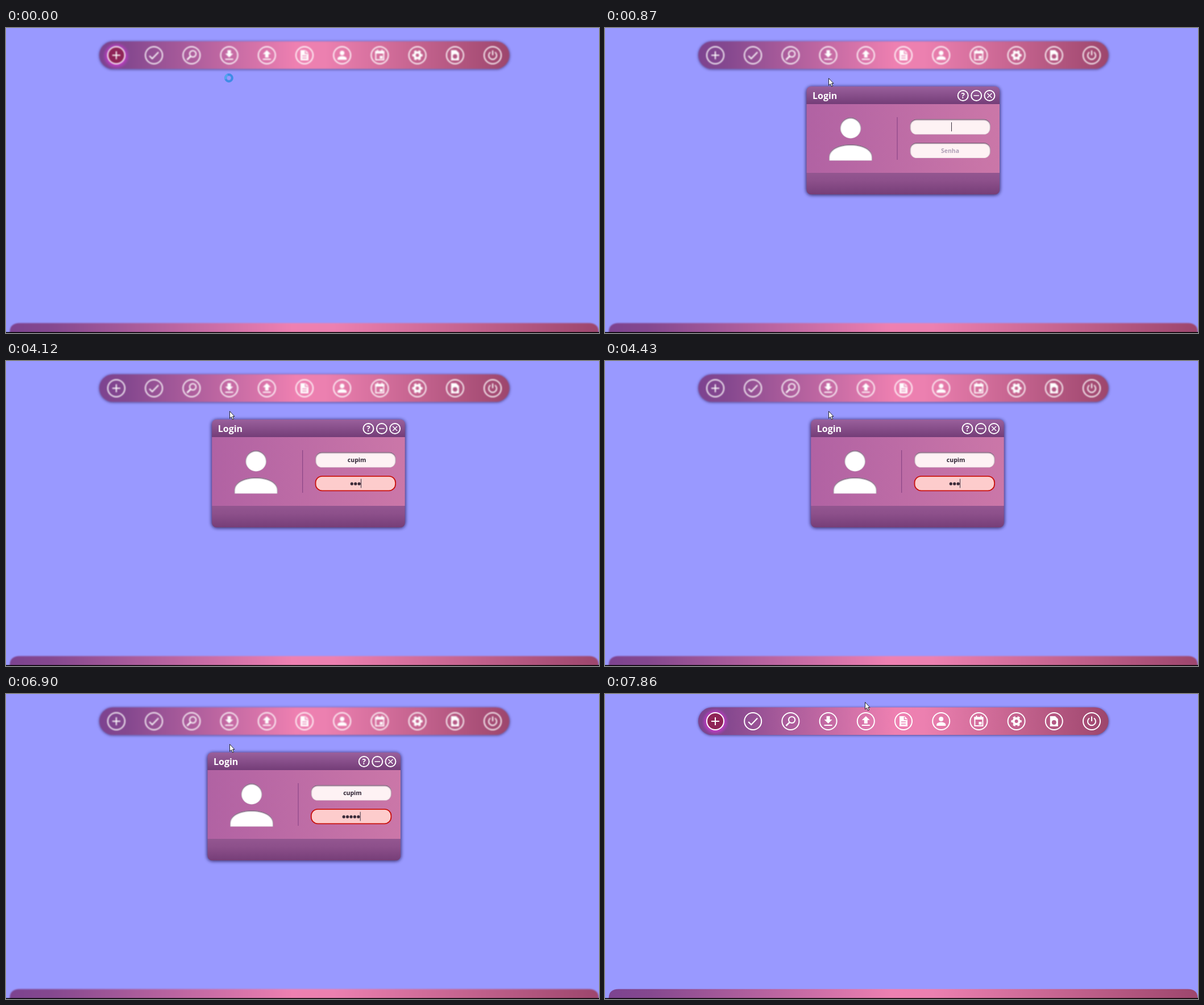
Recreate the animation shown at these times as an HTML page. Size 1043 by 537 pixels, loop 8000 ms.

```html
<!DOCTYPE html>
<html lang="pt">
<head>
<meta charset="utf-8">
<title>Login</title>
<style>
  html, body { margin: 0; width: 100%; height: 100%; overflow: hidden; background: #9999ff; }
  svg { display: block; width: 100%; height: 100%; }
  text { font-family: "Open Sans", "Noto Sans", sans-serif; font-weight: 700; }
  .line { fill: none; stroke: #fff; stroke-width: 2; }
  .field { font-size: 10.5px; text-anchor: middle; fill: #2b2030; }
  .caret { stroke: #3a3040; stroke-width: 1; }
</style>
</head>
<body>
<svg viewBox="0 0 1043 537">
  <defs>
    <linearGradient id="bar">
      <stop offset="0" stop-color="#7d4390"/>
      <stop offset=".07" stop-color="#85488f"/>
      <stop offset=".48" stop-color="#ee80b1"/>
      <stop offset=".55" stop-color="#ec80b0"/>
      <stop offset="1" stop-color="#9d466d"/>
    </linearGradient>
    <linearGradient id="head" x2="0" y2="1">
      <stop stop-color="#9a609c"/><stop offset="1" stop-color="#743d78"/>
    </linearGradient>
    <linearGradient id="body">
      <stop stop-color="#b162a3"/><stop offset="1" stop-color="#cb77a8"/>
    </linearGradient>
    <linearGradient id="foot" x2="0" y2="1">
      <stop stop-color="#935690"/><stop offset=".35" stop-color="#8d508b"/><stop offset="1" stop-color="#753d77"/>
    </linearGradient>
    <radialGradient id="glow">
      <stop offset=".6" stop-color="#c83cc8"/><stop offset="1" stop-color="#b03cc0" stop-opacity="0"/>
    </radialGradient>
    <clipPath id="frame"><rect x="354.5" y="103" width="339.5" height="190" rx="8"/></clipPath>
    <filter id="soft" color-interpolation-filters="sRGB"><feGaussianBlur stdDeviation="1.05"/></filter>
    <filter id="shade" x="-10%" y="-50%" width="120%" height="200%"><feGaussianBlur stdDeviation="2"/></filter>
    <filter id="deep" x="-10%" y="-15%" width="120%" height="130%"><feGaussianBlur stdDeviation="3.4"/></filter>
    <filter id="inset" color-interpolation-filters="sRGB">
      <feOffset in="SourceAlpha" dy="1"/>
      <feGaussianBlur stdDeviation="1.3" result="in"/>
      <feComposite in="SourceAlpha" in2="in" operator="out" result="edge"/>
      <feFlood flood-color="#3c143c"/>
      <feComposite in2="edge" operator="in" result="dark"/>
      <feMerge><feMergeNode in="SourceGraphic"/><feMergeNode in="dark"/></feMerge>
    </filter>
  </defs>

  <rect width="1043" height="537" fill="#9999ff"/>
  <g id="chrome">
    <rect x="164" y="24" width="722" height="49" rx="24.5" fill="#35255f" opacity=".75" filter="url(#shade)"/>
    <rect x="164" y="23.5" width="721.5" height="48.5" rx="24.2" fill="url(#bar)"/>
    <path d="M6.500 537V535Q7 519.500 24 519.500H1025Q1042 519.500 1042.500 535V537Z" fill="url(#bar)"/>
    <g id="focus">
      <circle cx="194" cy="49" r="24" fill="url(#glow)"/>
      <circle cx="194" cy="48" r="15" fill="#8f2457"/>
    </g>
    <g id="icons"></g>
  </g>
  <rect y="535.4" width="1043" height="1.6" fill="#000"/>

  <g id="dialog">
    <rect x="354" y="103.500" width="340.500" height="190.500" rx="9" fill="#181038" opacity=".85" filter="url(#deep)"/>
    <g clip-path="url(#frame)">
      <rect x="354" y="103" width="341" height="31" fill="url(#head)"/>
      <rect x="354" y="134" width="341" height="121" fill="url(#body)"/>
      <rect x="354" y="255" width="341" height="39" fill="url(#foot)"/>
    </g>
    <text x="365" y="125" font-size="16" fill="#fff">Login</text>
    <g class="line" stroke-width="1.7">
      <circle cx="629.7" cy="119" r="9"/>
      <circle cx="653.2" cy="119" r="9"/>
      <circle cx="676.4" cy="119" r="9"/>
      <path d="M648.500 119h9.500M672.400 115l8 8M680.400 115l-8 8" stroke-width="1.5"/>
    </g>
    <text x="629.7" y="124" font-size="13.5" text-anchor="middle" fill="#fff">?</text>
    <g fill="#fff" filter="url(#inset)">
      <circle cx="432" cy="176" r="18.5"/>
      <path d="M394 233.500V227C394 213 411 205 432 205S470 213 470 227V233.500Z"/>
    </g>
    <path d="M514 157V232" stroke="#823f82"/>
    <rect x="536.5" y="160.5" width="141.500" height="27" rx="11.5" fill="#fef2f4" filter="url(#inset)"/>
    <rect id="plain" x="536.5" y="202" width="141.500" height="27" rx="11.5" fill="#fef2f4" filter="url(#inset)"/>
    <rect id="wrong" x="536.8" y="202.8" width="140.600" height="25.500" rx="11.5" fill="#fdcccc" stroke="#c8100c" stroke-width="1.8"/>
    <text id="user" class="field" x="609.4" y="178"></text>
    <text id="hint" class="field" x="607" y="219.700" style="fill:#b0a0b6">Senha</text>
    <g id="dots" fill="#3a2a38"></g>
    <path id="userCaret" class="caret" d="M0 166v16"/>
    <path id="passCaret" class="caret" d="M0 207.500v16"/>
  </g>

  <g id="busy" fill="none" stroke-width="4.2">
    <circle cx="392" cy="88" r="5.800" stroke="#3f8ce6"/>
    <path d="M386.600 90A5.800 5.800 0 0 1 390 82.600" stroke="#55a5ee"/>
  </g>
  <path id="arrow" d="M.5.5V13L3.400 10.300 5.400 15 7.600 14 5.600 9.600H9Z" fill="#fff" stroke="#111" stroke-width=".9"/>
</svg>
<script>
const $ = id => document.getElementById(id);
const LOOP = 8000, NAME = "cupim";
const FADE_IN = [470, 550, 620, 700, 780, 870];
const FADE_OUT = [7300, 7380, 7460, 7550, 7630];
const KEYS = [1650, 1950, 2110, 2180, 2350];
const SECRET = [3270, 3500, 3730], ERASE = [5360, 5510, 5660];
const RETRY = [6140, 6520, 6670, 6750, 6900];
const ALPHA = [0, .15, .36, .56, .73, .88, 1];

const stroke = (d, w = 2) => `<path class="line" d="${d}" style="stroke-width:${w}"/>`;
const solid = d => `<path d="${d}" fill="#fff"/>`;
const ICONS = [
  stroke("M-7 0H7M0-7V7"),
  stroke("M-8 1L-3 6 8-5.500", 2.2),
  `<circle class="line" cx="2.200" cy="-2.500" r="5.600"/>` + stroke("M-2 2L-8 8", 2.6),
  solid("M-3-9H3V-3H7L0 4-7-3H-3ZM-7 6H7V8H-7Z"),
  solid("M-3 4H3V-2H7L0-9-7-2H-3ZM-7 6H7V8H-7Z"),
  solid("M-7-9H2L7-4V9H-7Z") + `<path d="M-4 1H4M-4 5H4M1.500-8V-3H6.500" fill="none" stroke="#e983b2" stroke-width="1.600"/>`,
  `<circle cy="-4" r="4" fill="#fff"/>` + solid("M-8 8V6C-8 0 8 0 8 6V8Z"),
  stroke("M-7-6.500H7V8H-7Z") + solid("M-8-7.500H8V-3H-8ZM-5-10H-3V-6H-5ZM3-10H5V-6H3ZM0 1H5V6H0Z"),
  `<circle class="line" r="5" style="stroke-width:4"/>
   <circle class="line" r="7.500" pathLength="12" stroke-dasharray="1 1" stroke-dashoffset=".5" style="stroke-width:3.400"/>`,
  solid("M-7-9H2L7-4V9H-7Z") + `<circle cy="2" r="4" fill="#b45884"/>`,
  stroke("M-4-5.500A7 7 0 1 0 4-5.500M0-8.500V0")
];
$("icons").innerHTML = ICONS.map((art, i) =>
  `<g transform="translate(${194 + 66.2 * i} 48)"><circle class="line" r="15"/>${art}</g>`).join("");

const passed = (times, t) => times.filter(x => t >= x).length;
const show = (id, on) => $(id).setAttribute("visibility", on ? "inherit" : "hidden");
const move = (id, x, y = 0) => $(id).setAttribute("transform", `translate(${x} ${y})`);

function shake(t) {
  const i = Math.floor((t - 3960) / 77);
  if (i < 1 || i > 9) return 0;
  return i % 2 ? -8 : 7.7;
}

function draw(t) {
  const gone = passed(FADE_OUT, t);
  const alpha = ALPHA[passed(FADE_IN, t)] * (1 - gone / FADE_OUT.length);
  const modal = gone < FADE_OUT.length;
  $("dialog").setAttribute("opacity", alpha);
  move("dialog", shake(t), 16 * (1 - alpha));

  if (modal) $("chrome").setAttribute("filter", "url(#soft)");
  else $("chrome").removeAttribute("filter");
  show("focus", t < 150 || !modal);
  show("busy", t < 150);
  show("arrow", t >= 150);
  if (t < 7860) move("arrow", 393, 88);
  else move("arrow", 457, 14);

  const onPass = t >= 2810, failed = t >= 3960;
  const user = $("user");
  user.textContent = NAME.slice(0, passed(KEYS, t));
  const half = user.textContent ? user.getComputedTextLength() / 2 : 0;
  move("userCaret", 609.5 + half);
  show("userCaret", !onPass);
  show("hint", !onPass);
  show("plain", !failed);
  show("wrong", failed);

  const count = passed(SECRET, t) - passed(ERASE, t) + passed(RETRY, t);
  $("dots").innerHTML = Array.from({ length: count }, (_, i) =>
    `<circle cx="${607 + (i - (count - 1) / 2) * 6.4}" cy="216.200" r="2.600"/>`).join("");
  show("passCaret", onPass);
  move("passCaret", 607.2 + count * 3.2);
  $("passCaret").setAttribute("opacity", t >= 4960 && t < 5360 ? .35 : 1);
}

const start = performance.now();
function tick() {
  draw((performance.now() - start) % LOOP);
  requestAnimationFrame(tick);
}
tick();
</script>
</body>
</html>
```
